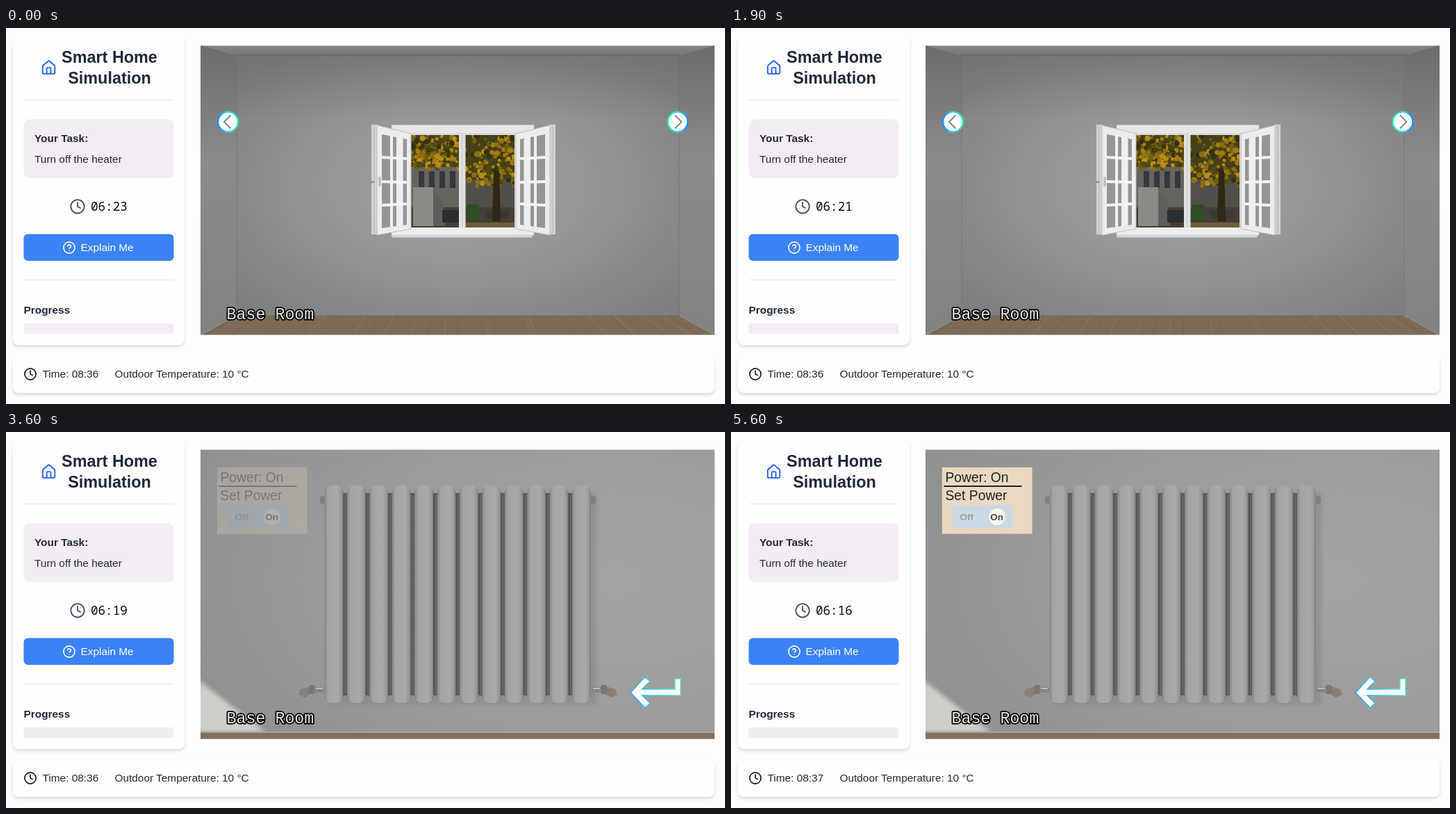
An HTML page for the animation above (6.1 s loop, 1035 by 541 pixels).

```html
<!DOCTYPE html>
<html lang="en">
<head>
<meta charset="utf-8">
<title>Smart Home Simulation</title>
<style>
  html, body { margin: 0; width: 100%; height: 100%; overflow: hidden; background: #fdfdfd; }
  svg { display: block; width: 100vw; height: 100vh; }
  text { font-family: "Liberation Sans", Arial, sans-serif; font-size: 15.4px; fill: #1f2937; white-space: pre; }
  .card { fill: #fefefe; filter: drop-shadow(0 3px 2px rgba(0,0,0,.13)); }
  .bold { font-weight: 700; }
  .title { font-weight: 700; font-size: 23.4px; text-anchor: middle; }
  .timer { font-family: "Noto Sans Mono", "DejaVu Sans Mono", monospace; font-size: 17.6px; fill: #0b0b0b; }
  .place { font-family: "Courier New", "Liberation Mono", monospace; font-size: 23.3px; fill: #e6e6e6;
           stroke: #000; stroke-width: 3.5px; stroke-linejoin: round; paint-order: stroke; }
  .panel { font-size: 19.3px; fill: #222; }
  .option { font-size: 13.5px; font-weight: 700; text-anchor: middle; }
  .icon { fill: none; stroke-width: 2; stroke-linecap: round; stroke-linejoin: round; }
</style>
</head>
<body>
<svg id="stage" viewBox="0 0 1035 541" preserveAspectRatio="none"></svg>
<script>
const LOOP = 6100;
const stage = document.getElementById('stage');
const $ = id => document.getElementById(id);

let seed = 11;
const rnd = () => (seed = (seed * 16807) % 2147483647) / 2147483647;
const times = (n, f) => Array.from({ length: n }, (_, i) => f(i)).join('');

const rect = (x, y, w, h, fill, more = '') =>
  `<rect x="${x}" y="${y}" width="${w}" height="${h}" fill="${fill}" ${more}/>`;
const poly = (points, fill, more = '') => `<polygon points="${points}" fill="${fill}" ${more}/>`;
const line = (points, stroke, w, more = '') =>
  `<polyline points="${points}" fill="none" stroke="${stroke}" stroke-width="${w}" ${more}/>`;
const text = (x, y, cls, str, id = '') => `<text x="${x}" y="${y}" class="${cls}" ${id && `id="${id}"`}>${str}</text>`;
const icon = (x, y, scale, color, body) =>
  `<g class="icon" stroke="${color}" transform="translate(${x} ${y}) scale(${scale})">${body}</g>`;
const stops = list => list.map(([at, c, o = 1]) => `<stop offset="${at}" stop-color="${c}" stop-opacity="${o}"/>`).join('');
const linear = (id, dir, list) => `<linearGradient id="${id}" ${dir}>${stops(list)}</linearGradient>`;
const radial = (id, at, list) => `<radialGradient id="${id}" ${at}>${stops(list)}</radialGradient>`;
const DOWN = 'x1="0" y1="0" x2="0" y2="1"';

const clockFace = '<circle cx="12" cy="12" r="10"/><path d="M12 6v6l4 2"/>';
const house = '<path d="M15 21v-8a1 1 0 0 0-1-1h-4a1 1 0 0 0-1 1v8"/>' +
  '<path d="M3 10a2 2 0 0 1 .709-1.528l7-5.999a2 2 0 0 1 2.582 0l7 5.999A2 2 0 0 1 21 10v9a2 2 0 0 1-2 2H5a2 2 0 0 1-2-2z"/>';
const question = '<circle cx="12" cy="12" r="10"/><path d="M9.09 9a3 3 0 0 1 5.83 1c0 2-3 3-3 3M12 17h.01"/>';

const defs = `<defs>
  <clipPath id="view"><rect x="280" y="25.5" width="740" height="416"/></clipPath>
  <clipPath id="pane"><rect x="583" y="154" width="149" height="133"/></clipPath>
  ${radial('wallDark', 'cx=".5" cy=".5" r=".65"', [[0, '#a0a0a0'], [.45, '#979797'], [1, '#7f7f7f']])}
  ${radial('wallSun', 'cx=".5" cy=".45" r=".7"', [[0, '#a5a5a5'], [.5, '#9e9e9e'], [1, '#898989']])}
  ${radial('wallDim', 'cx=".5" cy=".5" r=".65"', [[0, '#a4a4a4'], [.5, '#9e9e9e'], [1, '#818181']])}
  ${linear('topShade', DOWN, [[0, '#555', .3], [.25, '#555', 0]])}
  ${linear('sideDim', DOWN, [[0, '#6c6c6c'], [.4, '#8b8b8b'], [1, '#828282']])}
  ${linear('sideSun', DOWN, [[0, '#828282'], [.4, '#9d9d9d'], [1, '#939393']])}
  ${linear('ceiling', DOWN, [[0, '#868686'], [1, '#777']])}
  ${linear('ridge', '', [[0, '#858585'], [.18, '#a4a4a4'], [.7, '#a9a9a9'], [.9, '#999'], [1, '#7a7a7a']])}
  ${linear('gap', '', [[0, '#484848'], [.6, '#6c6c6c'], [1, '#555']])}
  ${radial('closeWall', 'cx=".8" cy=".45" r=".9"', [[0, '#a4a4a4'], [.6, '#9b9b9b'], [1, '#909090']])}
  ${linear('ringL', '', [[0, '#1690ff'], [.5, '#35d4e6'], [1, '#25f0a8']])}
  ${linear('ringR', '', [[0, '#25f0a8'], [.5, '#35d4e6'], [1, '#1690ff']])}
  ${linear('ringBack', '', [[0, '#2aa2f0'], [1, '#5de8c4']])}
  <filter id="soft"><feGaussianBlur stdDeviation="3"/></filter>
  <filter id="haze"><feGaussianBlur stdDeviation=".7"/></filter>
</defs>`;

const sidebar = `
  <rect class="card" x="10" y="14" width="247" height="442" rx="8"/>
  <rect class="card" x="10" y="472" width="1010" height="53" rx="8"/>
  ${icon(49.9, 45.5, .97, '#2563eb', house)}
  ${text(149, 49.5, 'title', 'Smart Home')}${text(149, 80, 'title', 'Simulation')}
  ${rect(25.5, 103, 216, 1, '#e5e7eb')}${rect(25.5, 362, 216, 1, '#e5e7eb')}
  ${rect(25.5, 131.5, 216, 84, '#f4ecf5', 'rx="8"')}
  ${text(41, 163.5, 'bold', 'Your Task:')}${text(41, 194, '', 'Turn off the heater')}
  ${icon(91.4, 245.2, .97, '#4b5563', clockFace)}${text(122, 263, 'timer', '06:23', 'timer')}
  ${rect(25.5, 296.5, 216, 38.5, '#3b82f6', 'rx="6"')}
  ${icon(81.3, 306.3, .808, '#fff', question)}
  <text x="107.5" y="321.3" style="fill:#fff">Explain Me</text>
  ${text(25.5, 410.5, 'bold', 'Progress')}
  ${rect(25.5, 425, 216, 15, '#f4ecf5', 'rx="3"')}
  ${icon(25.3, 488.3, .808, '#111', clockFace)}
  ${text(52.5, 503, '', 'Time: 08:36', 'clock')}${text(156.5, 503, '', 'Outdoor Temperature: 10 °C')}`;

// An empty room: back wall from (l, t) to (r, b), the rest in perspective.
function room(l, t, r, b, wall, side, wood) {
  const planks = times(26, i => {
    const x = l + (r - l) * (i + rnd()) / 26;
    return line(`${x},${b} ${x + (x - 650) * .14},442`, rnd() > .5 ? '#fff' : '#2b1c0c', 2, 'opacity=".05"');
  });
  return poly(`280,25 1020,25 ${r},${t} ${l},${t}`, 'url(#ceiling)') +
    poly(`280,25 ${l},${t} ${l},${b} 280,442`, `url(#${side})`) +
    poly(`1020,25 ${r},${t} ${r},${b} 1020,442`, `url(#${side})`) +
    rect(l, t, r - l, b - t, `url(#${wall})`) + rect(l, t, r - l, b - t, 'url(#topShade)') +
    poly(`${l},${b} ${r},${b} 1020,442 280,442`, wood) + planks +
    line(`280,25 ${l},${t} ${l},${b}`, '#707070', 1, 'opacity=".6"') +
    line(`1020,25 ${r},${t} ${r},${b}`, '#707070', 1, 'opacity=".6"') +
    line(`${l},${t} ${r},${t}`, '#666', 1) + line(`${l},${b} ${r},${b}`, '#6d645a', 1, 'opacity=".7"');
}

function garden() {
  const tones = ['#a57c10', '#8d6c12', '#716012', '#4f4a12', '#34320f', '#b88d18'];
  const leaves = times(330, i => {
    const x = 583 + rnd() * 149, low = x > 660 ? 74 : 50;
    return `<circle cx="${x}" cy="${154 + rnd() * low}" r="${1.5 + rnd() * 3}" fill="${tones[i % 6]}"/>`;
  });
  return `<g clip-path="url(#pane)"><g filter="url(#haze)">
    ${rect(583, 154, 149, 133, '#45401a')}
    ${rect(583, 200, 70, 60, '#66645f')}${rect(661, 218, 71, 50, '#514f49')}
    ${times(4, i => rect(594 + i * 15, 206, 8, 24, '#34383c'))}
    ${rect(583, 258, 149, 30, '#453f35')}
    ${rect(586, 229, 29, 56, '#8a8a87')}${poly('615,234 628,246 632,284 615,285', '#5d5f5d')}
    ${rect(628, 262, 24, 18, '#2b2e31')}
    ${rect(664, 254, 17, 22, '#2b4f20')}${rect(690, 262, 34, 12, '#393a35')}
    ${leaves}${poly('702,205 710,205 712,278 700,278', '#302716')}
    ${rect(661, 280, 71, 7, '#6f5e37')}</g></g>`;
}

function sash() {
  return rect(526, 139, 9, 158, '#d2d2d2') + line('530,140 530,296', '#b3b3b3', 1) +
    poly('534,140 583,152 583,289 534,298', '#ececee') +
    poly('541,153 577,160 577,283 541,288', '#959595') +
    rect(553, 154, 4, 132, '#f2f2f2') + rect(562, 156, 9, 130, '#eee') + line('571.5,157 571.5,285', '#c5c5c5', 1) +
    line('541,186 577,188', '#f4f4f4', 4) + line('541,221 577,222', '#f4f4f4', 4) +
    line('541,255 577,253', '#f4f4f4', 4) +
    line('534,140 583,152 583,289 534,298 534,140', '#bdbdbd', 1);
}

const windowRoom = room(332, 39, 969, 414, 'wallDark', 'sideDim', '#7c6a56') +
  rect(555, 139.5, 205, 12, '#e6e6e6') + line('555,151.5 760,151.5', '#aaa', 1) +
  rect(578, 151, 158, 138, '#d9d9d9') + garden() + rect(652, 152, 9.5, 136, '#e2e2e2') +
  line('656.7,152 656.7,287', '#c2c2c2', 1) +
  rect(555, 287, 205, 11, '#ededed') + rect(555, 297.5, 203, 4, '#d6d6d6', 'rx="2"') +
  sash() + `<g transform="translate(1317 0) scale(-1 1)">${sash()}</g>` +
  rect(524, 220, 6, 3, '#999') + rect(536, 214, 4, 14, '#c2c2c2', 'rx="2"');

const ribs = (n, x, y, step, w, h) => rect(x + w / 2, y + h * .035, step * (n - 1), h * .93, '#555') +
  times(n - 1, i => rect(x + i * step + w, y + h * .04, step - w, h * .92, 'url(#gap)')) +
  times(n, i => rect(x + i * step, y, w, h, 'url(#ridge)', `rx="${w * .4}"`));

const radiator = `<g id="radiator">
  ${rect(656, 397.5, 11, 3.5, '#8e8a86', 'rx="1.5"')}${rect(760, 397.5, 10, 3.5, '#8e8a86', 'rx="1.5"')}
  ${ribs(12, 665, 324, 8.1, 7, 79)}</g>`;

const segment = 'fill="none" stroke="#e80f0b" stroke-width="2" stroke-linecap="round"';
const display = rect(480, 249.5, 69, 35.5, '#050505', 'rx="3" stroke="#2f2f2f" stroke-width="1.5"') +
  poly('481,280 487,273 490,284 482,284', '#262626') + poly('541,252 548,252 548,262', '#262626') +
  times(3, i => rect(547.5, 256 + i * 6, 2.5, 4, '#171717')) +
  `<path d="M507 260h2v15M514 260h7v15h-7M514.5 267.5h6" ${segment}/>`;

const sunnyWall = room(319, 40, 978, 413, 'wallSun', 'sideSun', '#95816a');

const heaterRoom = sunnyWall +
  poly('526,413 643,413 641,428 612,442 432,442 470,428', '#c2ad91', 'filter="url(#haze)"') +
  poly('526,328 526,413 643,413', '#dfdbd7', 'filter="url(#haze)"') + display + radiator;

const pictureRoom = room(303, 31, 996, 423, 'wallDim', 'sideDim', '#8f7a61') +
  poly('655,423 756,423 828,442 660,442', '#c2ad91', 'filter="url(#haze)"') +
  poly('756,347 756,423 655,423', '#dfdbd7', 'filter="url(#haze)"') +
  rect(561, 160, 101, 125, '#555', 'opacity=".35" filter="url(#soft)"') +
  rect(559, 157, 101, 125, '#414141') + rect(563, 161, 93, 117, '#d9d4cc') +
  rect(565.5, 163.5, 88, 112, '#aaa294');

const valve = poly('421,378 424,370 438,366 442,375 430,382', '#8b7f74') +
  rect(436, 364, 9, 13, '#777', 'rx="3"') + rect(444, 367, 14, 8, '#858585', 'rx="2"') +
  rect(446, 368, 10, 2, '#bdbdbd') + rect(452, 92, 8, 12, '#808080', 'rx="4"');

const panel = `<g id="panel">
  ${rect(303.5, 50.5, 130.5, 96.5, '#e9d9c3', 'stroke="#a99a85"')}
  ${text(308.5, 71.5, 'panel', 'Power: On', 'power')}${rect(306.5, 77, 112, 2, '#222')}
  ${text(308.5, 98, 'panel', 'Set Power')}
  <g id="toggle">${rect(318.5, 105.5, 86.5, 32.5, '#bfdaf1')}
    <circle id="knob" cx="383" cy="122" r="12" fill="#fff"/>
    ${text(339.3, 126.5, 'option', 'Off', 'off')}${text(382.7, 126.5, 'option', 'On', 'on')}</g></g>`;

const closeUp = rect(280, 25, 740, 417, 'url(#closeWall)') +
  poly('270,352 374,432 270,432', '#cfcecb', 'filter="url(#soft)"') +
  rect(280, 431, 740, 2.5, '#aaa196') + rect(280, 433, 740, 9, '#82705f') +
  rect(466, 88, 384, 304, '#777', 'opacity=".35" filter="url(#soft)"') +
  valve + `<g transform="translate(1301 0) scale(-1 1)">${valve}</g>` +
  ribs(12, 458.5, 77, 32.4, 27, 313) + panel +
  poly('899,375 920,352 927,359 916,370 963,370 963,355 971,355 971,379 916,379 927,390 920,397', '#fff',
    'stroke="url(#ringBack)" stroke-width="1.6"');

const arrow = (x, dir, ring) => `<circle cx="${x}" cy="135" r="14.4" fill="#fff" stroke="url(#${ring})" stroke-width="2.4"/>` +
  line(`${x - dir * 4},125.5 ${x + dir * 5.5},135 ${x - dir * 4},144.5`, '#858585', 2);

const scenes = { window: windowRoom, heater: heaterRoom, plain: sunnyWall, picture: pictureRoom, close: closeUp };

stage.innerHTML = defs + rect(0, 0, 1035, 541, '#fdfdfd') + sidebar +
  `<g clip-path="url(#view)">${Object.entries(scenes).map(([id, body]) => `<g id="scene-${id}">${body}</g>`).join('')}
   <g id="arrows">${arrow(319.5, -1, 'ringL')}${arrow(967, 1, 'ringR')}</g>
   ${text(317.5, 419, 'place', 'Base Room')}</g>`;

const schedule = [[0, 'window'], [800, 'heater'], [1200, 'plain'], [1500, 'picture'],
  [1900, 'window'], [2300, 'heater'], [3600, 'close']];
const clamp = v => Math.min(1, Math.max(0, v));
const show = (id, on) => $(id).setAttribute('display', on ? 'inline' : 'none');

function draw(t) {
  const current = schedule.filter(([at]) => t >= at).pop()[1];
  Object.keys(scenes).forEach(id => show('scene-' + id, id === current));
  show('arrows', current !== 'close');
  $('radiator').style.filter = t >= 3100 ? 'brightness(.67)' : 'none';

  const seconds = 23 - Math.max(0, Math.floor((t - 200) / 900) + 1);
  $('timer').textContent = '06:' + seconds;
  $('clock').textContent = 'Time: 08:' + (t >= 4900 ? 37 : 36);

  // The switch slides to Off, then the heater springs back on.
  const step = Math.floor(t / 100) * 100;
  const slide = clamp((step - 4300) / 300) - clamp((step - 4800) / 200);
  const isOff = slide > .5;
  $('panel').setAttribute('opacity', clamp((step - 3500) / 400));
  $('knob').setAttribute('cx', 383 - 43.5 * slide);
  $('off').style.fill = isOff ? '#111' : '#85888c';
  $('on').style.fill = isOff ? '#85888c' : '#111';
  $('power').textContent = 'Power: ' + (t >= 4600 && t < 5000 ? 'Off' : 'On');
  $('toggle').setAttribute('opacity', t >= 5000 ? .72 : 1);
}

const start = performance.now();
function tick() {
  draw((performance.now() - start) % LOOP);
  requestAnimationFrame(tick);
}
tick();
</script>
</body>
</html>
```
